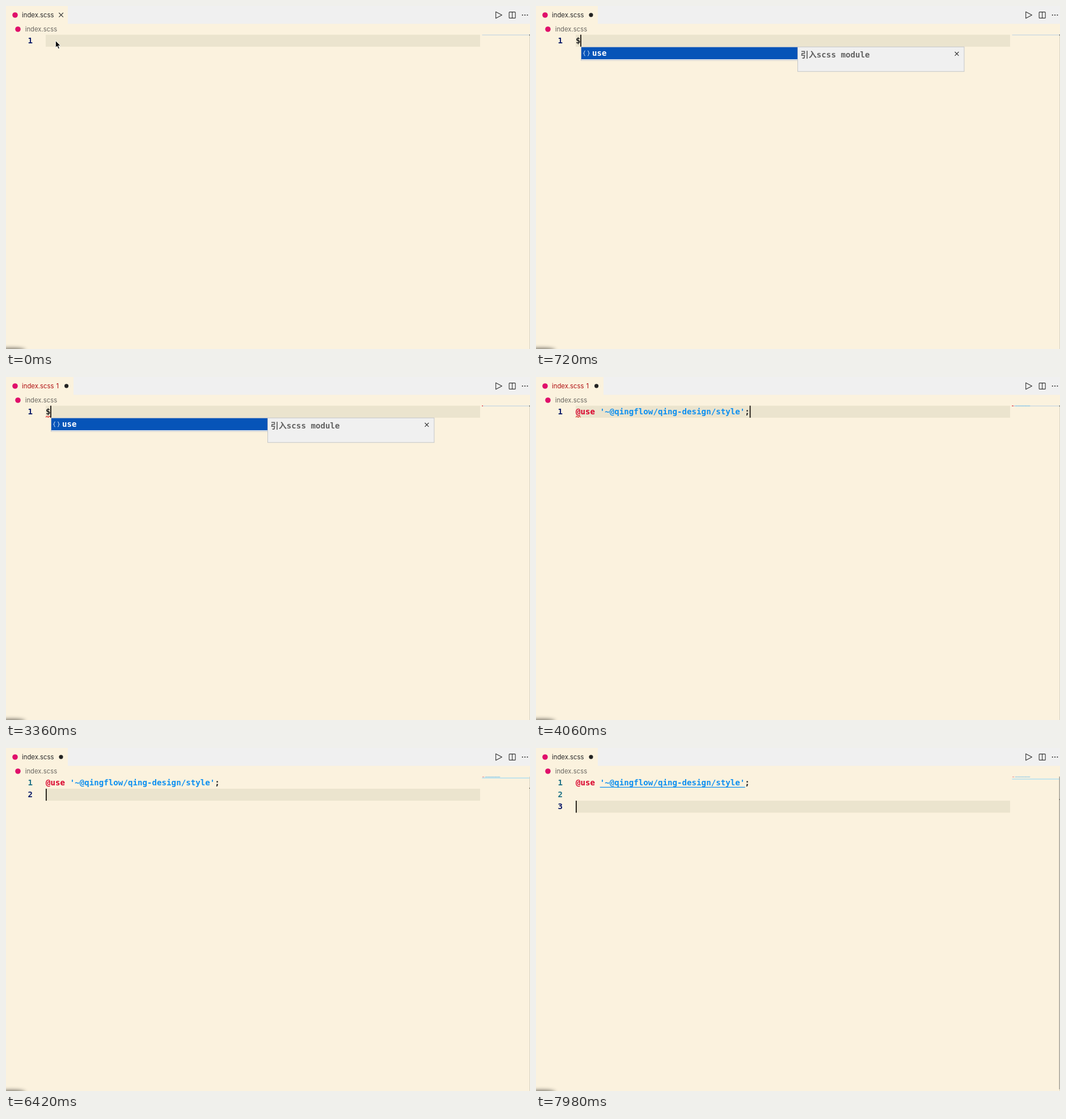
An HTML page that plays this animation: 924 px wide and 606 px high, repeating every 8 s.

```html
<!DOCTYPE html>
<html lang="en">
<head>
<meta charset="utf-8">
<title>Editor snippet</title>
<style>
  html, body { margin: 0; width: 100%; height: 100%; overflow: hidden; background: #fbf2de; }
  svg { display: block; width: 924px; height: 606px; }
  text { white-space: pre; }
  .code { font: bold 14.17px "DejaVu Sans Mono", "Noto Sans CJK SC", "Noto Sans CJK", monospace; }
  .ui { font: 11.3px Inter, "Open Sans", sans-serif; }
  .line { fill: none; stroke: #333; stroke-width: 1.1; stroke-linejoin: round; }
</style>
</head>
<body>
<svg viewBox="0 0 924 606">
  <defs>
    <filter id="blur" x="-50%" y="-200%" width="200%" height="500%"><feGaussianBlur stdDeviation="3"/></filter>
  </defs>
  <rect width="924" height="606" fill="#fbf2de"/>
  <ellipse cx="10" cy="608" rx="24" ry="4" fill="#4b483f" opacity=".75" filter="url(#blur)"/>

  <!-- tab bar -->
  <rect id="bar" y="0" height="31.5" fill="#f0f0f0"/>
  <circle cx="16" cy="16" r="4.8" fill="#e0106a"/>
  <text id="label" class="ui" x="28" y="19.6">index.scss</text>
  <text id="count" class="ui" x="88.5" y="19.6" fill="#b01011">1</text>
  <path id="close" class="line" d="M93.3 12l7.6 7.6M100.9 12l-7.6 7.6"/>
  <circle id="dot" cy="15.8" r="3.6" fill="#222"/>
  <path class="line" d="M863.7 10.2v11.6l10.8-5.8z"/>
  <path class="line" d="M888.2 10.6h9a1 1 0 0 1 1 1v8.8a1 1 0 0 1-1 1h-9a1 1 0 0 1-1-1v-8.8a1 1 0 0 1 1-1zM892.7 10.6v10.8"/>
  <g fill="#333"><circle cx="910.8" cy="16" r="1.1"/><circle cx="915.1" cy="16" r="1.1"/><circle cx="919.4" cy="16" r="1.1"/></g>
  <circle cx="21" cy="41" r="4.8" fill="#e0106a"/>
  <text class="ui" x="33.7" y="45.2" fill="#6b6862">index.scss</text>

  <!-- editor -->
  <rect id="active" x="70" width="766" height="21.2" fill="#ebe4ce"/>
  <g id="numbers" class="code" text-anchor="end"></g>
  <text id="dollar" class="code" x="70" y="66" fill="#222">$</text>
  <text id="code" class="code" x="70" y="66"><tspan fill="#d9002b">@use</tspan> <tspan fill="#0c8ff0">'~@qingflow/qing-design/style'</tspan><tspan fill="#222">;</tspan></text>
  <path id="link" d="M112.7 69.4h256" stroke="#0c8ff0" stroke-width="1.1"/>
  <path id="squiggle" d="M70 71.2l2.2-2 2.2 2 2.2-2 2.2 2" fill="none" stroke="#e02020" stroke-width="1.1"/>
  <rect id="caret" width="1.8" height="21.2" fill="#17120c"/>

  <!-- minimap and scrollbar -->
  <rect id="mapLine" x="839.5" width="84.5" height="1.7"/>
  <g id="mapText" stroke-width="1.2" stroke-dasharray="1.3 .4">
    <path d="M840 51.2h3.6" stroke="#e68a8f"/><path d="M845 51.2h26.3" stroke="#7cc4ea"/>
  </g>
  <rect id="mapError" x="839.4" y="50.2" width="1.6" height="1.8" fill="#e4484c"/>
  <path d="M923.5 50.5V606" stroke="#d9d3c3"/>
  <rect id="slider" x="922.4" y="50.5" width="1.6" height="552.5" fill="#a9a69c"/>
  <rect id="ruler" x="922.8" width="1.2" height="1.6" fill="#58554e"/>

  <!-- suggestions -->
  <g id="popup">
    <rect x="79.5" y="72.3" width="382" height="23.8" fill="#f3f3f3" stroke="#c4c6c8"/>
    <rect x="80" y="72.8" width="381.2" height="21.3" fill="#0654b8"/>
    <path d="M86.9 79.2q-1.8 0-1.8 1.8v1q0 1.5-1.5 1.5 1.5 0 1.5 1.5v1.2q0 1.8 1.8 1.8M91 79.2q1.8 0 1.8 1.8v1q0 1.5 1.5 1.5-1.5 0-1.5 1.5v1.2q0 1.8-1.8 1.8" fill="none" stroke="#d5e4f6"/>
    <text class="code" x="99" y="88.2" fill="#fff">use</text>
  </g>
  <g id="doc">
    <rect x="461.5" y="72.3" width="293.5" height="43.4" fill="#f0f0f0" stroke="#c4c6c8"/>
    <text class="code" x="466.5" y="91.4" fill="#616161">引入scss module</text>
    <path class="line" d="M738.6 81l6.8 6.8M745.4 81l-6.8 6.8"/>
  </g>
  <path id="pointer" d="M87.4 61.2v12.4l2.8-2.6 2 4.7 2.2-.9-2-4.6h3.8z" fill="#0c0c0c" stroke="#fff" stroke-width=".9"/>
</svg>
<script>
const LOOP = 8000, TOP = 50.7, ROW = 21.2, CHAR = 8.53;
const at = {
  hidePointer: 300, type: 580, list: 680, doc: 720, errorOn: 1980, tabOn: 2260,
  insert: 4060, errorOff: 5580, tabOff: 5860, enter1: 6420, enter2: 6840, link: 6860
};
const FADE = 140, SLIDE = 280;
const caretSpans = [[at.type, 1960], [3360, 5440], [at.enter1, LOOP]];

const el = {};
document.querySelectorAll('[id]').forEach(e => el[e.id] = e);
const show = (name, on) => el[name].setAttribute('display', on ? 'inline' : 'none');
const set = (name, key, value) => el[name].setAttribute(key, value);
const clamp = v => Math.max(0, Math.min(1, v));
const between = (t, a, b) => t >= a && t < b;
const mix = (a, b, p) => `rgb(${a.map((v, i) => Math.round(v + (b[i] - v) * p))})`;

const numbers = [1, 2, 3].map(n => {
  const node = document.createElementNS('http://www.w3.org/2000/svg', 'text');
  node.textContent = n;
  node.setAttribute('x', 47);
  node.setAttribute('y', 66 + (n - 1) * ROW);
  return el.numbers.appendChild(node);
});

function draw(t) {
  const row = t >= at.enter2 ? 2 : t >= at.enter1 ? 1 : 0;
  const y = TOP + row * ROW;
  const typed = t >= at.type, inserted = t >= at.insert;
  const badge = between(t, at.tabOn, at.tabOff);
  const error = between(t, at.errorOn, at.errorOff);

  set('bar', 'x', badge ? 119 : 109);
  set('bar', 'width', badge ? 805 : 815);
  const red = clamp((t - at.tabOn + 20) / FADE) - clamp((t - at.tabOff + 20) / FADE);
  set('label', 'fill', mix([40, 40, 40], [176, 16, 17], red));
  show('count', badge);
  show('close', !typed);
  show('dot', typed);
  set('dot', 'cx', badge ? 106.6 : 97);

  set('active', 'y', y);
  numbers.forEach((node, i) => {
    node.setAttribute('display', i <= row ? 'inline' : 'none');
    node.setAttribute('fill', i === row ? '#0b1a68' : '#1f7186');
  });
  show('dollar', typed && !inserted);
  show('code', inserted);
  show('link', t >= at.link);
  show('squiggle', error);
  show('caret', caretSpans.some(([a, b]) => between(t, a, b)));
  const column = row ? 0 : inserted ? 36 : 1;
  set('caret', 'x', 70 + column * CHAR - (row ? 0 : .4));
  set('caret', 'y', y);

  set('mapLine', 'y', 50.4 + row * 1.8);
  set('mapLine', 'fill', row ? '#b9e2ee' : '#d3dee1');
  show('mapText', inserted);
  show('mapError', error);
  set('ruler', 'y', 50.5 + row * 19.8);
  set('slider', 'opacity', clamp((t - at.enter2) / SLIDE));

  show('popup', between(t, at.list, at.insert));
  show('doc', between(t, at.doc, at.insert));
  show('pointer', t < at.hidePointer);
}

const start = performance.now();
function tick() {
  draw((performance.now() - start) % LOOP);
  requestAnimationFrame(tick);
}
tick();
</script>
</body>
</html>
```
